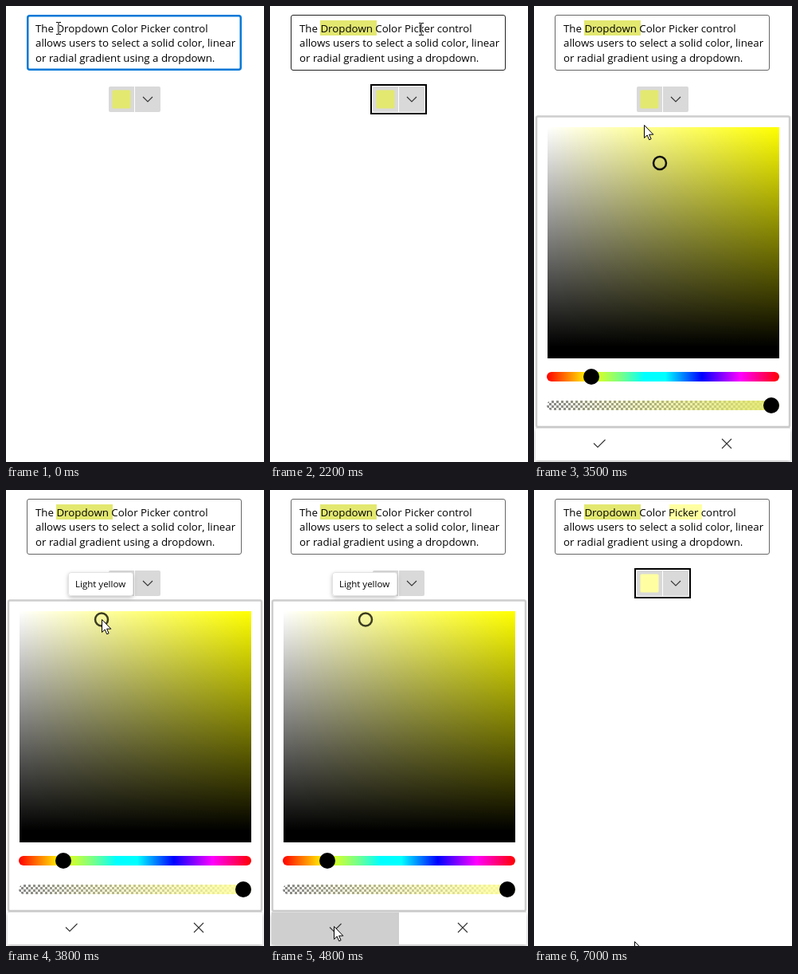
Recreate the animation shown at these times as an HTML page. Size 324x572 px, loop 7100 ms.

```html
<!DOCTYPE html>
<html lang="en">
<head>
<meta charset="utf-8">
<title>Dropdown color picker</title>
<style>
  html, body { margin: 0; width: 100%; height: 100%; overflow: hidden; background: #fff; }
  svg { display: block; isolation: isolate; font: 13.3px "Open Sans", "Noto Sans", sans-serif; }
  .small { font-size: 11.53px; }
  .icon { fill: none; stroke: #333; stroke-width: 1.1; }
  #beam { fill: none; stroke: #fff; mix-blend-mode: difference; }
</style>
</head>
<body>
<svg width="324" height="572" viewBox="0 0 324 572">
  <defs>
    <linearGradient id="saturation"><stop stop-color="#fff"/><stop offset="1" stop-color="#ff0"/></linearGradient>
    <linearGradient id="value" x2="0" y2="1"><stop stop-opacity="0"/><stop offset=".95"/></linearGradient>
    <linearGradient id="hue">
      <stop stop-color="#f00"/><stop offset=".18" stop-color="#ff0"/>
      <stop offset=".32" stop-color="#7f8"/><stop offset=".42" stop-color="#0ff"/>
      <stop offset=".51" stop-color="#0ff"/><stop offset=".667" stop-color="#00f"/>
      <stop offset=".833" stop-color="#f0f"/><stop offset="1" stop-color="#f00"/>
    </linearGradient>
    <linearGradient id="alpha">
      <stop class="picked" stop-opacity="0"/><stop class="picked" offset="1"/>
    </linearGradient>
    <pattern id="checker" width="6" height="6" x="16" y="495" patternUnits="userSpaceOnUse">
      <path fill="#fff" d="M0 0h6v6H0z"/><path fill="#888" d="M0 0h3v3H0zM3 3h3v3H3z"/>
    </pattern>
    <filter id="shadow" x="-20%" y="-40%" width="140%" height="190%">
      <feDropShadow dx="0" dy="2" stdDeviation="2.5" flood-opacity=".25"/>
    </filter>
    <clipPath id="selectionClip"><rect id="clipBox" y="18" height="19"/></clipPath>
    <g id="copy">
      <text x="37" y="33">The Dropdown Color Picker control</text>
      <text x="37" y="51">allows users to select a solid color, linear</text>
      <text x="37" y="70">or radial gradient using a dropdown.</text>
    </g>
  </defs>

  <path fill="#fff" d="M0 0h324v572H0z"/>

  <rect id="field" fill="#fff"/>
  <path id="goldMark" fill="#e3e870" d="M63 18h71v19H63z"/>
  <path id="lightMark" fill="#ffffa2" d="M170 18h41v19h-41z"/>
  <rect id="selection" y="18" height="19" fill="#0078d7"/>
  <use href="#copy"/>
  <use href="#copy" fill="#fff" clip-path="url(#selectionClip)"/>

  <path id="leftPart" d="M131 101h30v32h-30q-2 0-2-2v-28q0-2 2-2z"/>
  <path id="rightPart" d="M162 101h30q2 0 2 2v28q0 2-2 2h-30z"/>
  <rect id="swatchEdge" x="133.5" y="105.5" width="23" height="23" rx="1.5" fill="none" stroke="#d2d2d2"/>
  <rect id="swatch" x="133.5" y="105.5" width="23" height="23" rx="1.5"/>
  <path class="icon" d="M172 114l6 6 6-6"/>
  <rect id="ring" x="127" y="99" width="69" height="36" fill="none" stroke="#000" stroke-width="2"/>
  <text id="goldTip" class="small" x="143" y="157" fill="#c6c6c6">Gold</text>

  <g id="popup">
    <rect x="3" y="138.5" width="318" height="389.5" rx="2" fill="#fff" stroke="#cdcdcd" stroke-width="2.5"/>
    <rect x="2" y="530" width="320" height="40" fill="#fff" filter="url(#shadow)"/>
    <path stroke="#dedede" d="M2 529.5h320"/>
    <path id="accept" d="M2 530h160v40H2z"/>
    <path class="icon" d="M75 548.5l5 5 9.5-9.5M236 543l12 12M248 543l-12 12"/>
    <path fill="url(#saturation)" d="M17 152h291v290H17z"/>
    <path fill="url(#value)" d="M17 152h291v290H17z"/>
    <circle id="thumb" r="8" fill="none" stroke-width="2.5"/>
    <rect x="16" y="459" width="292" height="12" rx="6" fill="url(#hue)"/>
    <circle cx="72" cy="465" r="10"/>
    <rect x="16" y="495" width="292" height="12" rx="6" fill="url(#checker)"/>
    <rect x="16" y="495" width="292" height="12" rx="6" fill="url(#alpha)"/>
    <circle cx="298" cy="501" r="10"/>
  </g>

  <g id="lightTip">
    <rect x="78.5" y="103.5" width="81" height="29" rx="3" fill="#fff" stroke="#e2e2e2" filter="url(#shadow)"/>
    <text class="small" x="87" y="122">Light yellow</text>
  </g>

  <path id="beam" d="M-3 -7.5h2.5l.5 .5 .5 -.5h2.5M0 -7v14M-3 7.5h2.5l.5 -.5 .5 .5h2.5"/>
  <path id="arrow" fill="#fff" stroke="#000" d="M.5 .5v16l3.7-3.5 2.5 5.8 2.4-1-2.5-5.6h5.2z"/>
</svg>

<script>
const LOOP = 7100, STEP = 100;
const GOLD = '#e3e870', LIGHT = '#ffffa2';
const $ = id => document.getElementById(id);

const set = (id, attrs) => {
  for (const name in attrs) $(id).setAttribute(name, attrs[name]);
};
const show = (id, on) => set(id, { visibility: on ? 'visible' : 'hidden' });

// Latest entry whose start time has passed.
const at = (track, t) => track.filter(key => key[0] <= t).pop();

// start, x, y, pointer
const pointer = [
  [0, 66, 28, 'beam'], [300, 69, 28, 'beam'], [400, 74, 28, 'beam'], [500, 79, 28, 'beam'],
  [900, 118, 40, 'beam'], [1000, 166, 84, 'arrow'], [1100, 152, 108, 'arrow'], [1200, 144, 118, 'arrow'],
  [1900, 148, 104, 'arrow'], [2000, 160, 72, 'beam'], [2100, 178, 45, 'beam'], [2200, 190, 29, 'beam'],
  [2600, 189, 40, 'beam'], [2700, 184, 65, 'beam'], [2800, 180, 88, 'arrow'], [2900, 178, 104, 'arrow'],
  [3000, 177, 110, 'arrow'], [3400, 160, 128, 'arrow'], [3500, 138, 149, 'arrow'],
  [3600, 127, 157, 'arrow'], [3700, 120, 162, 'arrow'],
  [4000, 117, 180, 'arrow'], [4100, 107, 272, 'arrow'], [4200, 95, 366, 'arrow'],
  [4300, 87, 460, 'arrow'], [4400, 83, 522, 'arrow'], [4500, 80, 547, 'arrow'],
  [4900, 76, 557, 'arrow'], [5000, 63, 565, 'arrow'], [7000, 126, 566, 'arrow']
];

// start, x, width
const selected = [
  [0, 63, 0], [400, 63, 10], [500, 63, 15], [700, 63, 71],
  [1600, 63, 0], [2400, 170, 41], [3200, 170, 0]
];

// start, fill
const leftFill = [[0, '#d9d9d9'], [1200, '#f5f5f5'], [1600, '#9b9c98'], [1700, '#f5f5f5'], [2000, '#d9d9d9']];
const rightFill = [[0, '#d9d9d9'], [2900, '#f5f5f5'], [3200, '#9b9c98'], [3400, '#d9d9d9']];
const acceptFill = [[0, '#fff'], [4500, '#ececec'], [4800, '#cfcfcf']];

function draw(t) {
  const during = (from, to = LOOP) => t >= from && t < to;

  const focused = during(0, 1600) || during(2400, 3200);
  const inset = focused ? 1.25 : .5;
  set('field', {
    x: 26 + inset, y: 11 + inset, width: 270 - 2 * inset, height: 70 - 2 * inset, rx: 2.5,
    stroke: focused ? '#0078d7' : during(2000, 2400) ? '#222' : '#666',
    'stroke-width': 2 * inset
  });

  const [, x, width] = at(selected, t);
  set('selection', { x, width });
  set('clipBox', { x, width });
  show('goldMark', during(1700));
  show('lightMark', during(4900));

  const picked = during(3700) ? LIGHT : GOLD;
  set('leftPart', { fill: at(leftFill, t)[1] });
  set('rightPart', { fill: at(rightFill, t)[1] });
  set('swatch', { fill: picked });
  show('swatchEdge', during(1200, 2000));
  show('ring', during(1700, 2400) || during(4900));

  show('goldTip', during(3300, 3400));
  show('popup', during(3400, 4900));
  show('lightTip', during(3800, 4900));
  set('accept', { fill: at(acceptFill, t)[1] });
  set('thumb', during(3700)
    ? { cx: 120, cy: 162.5, stroke: '#3c3c22' }
    : { cx: 158, cy: 197, stroke: '#111' });
  document.querySelectorAll('.picked').forEach(stop => stop.setAttribute('stop-color', picked));

  const [, px, py, kind] = at(pointer, t);
  for (const id of ['beam', 'arrow']) {
    show(id, id === kind);
    set(id, { transform: `translate(${px} ${py})` });
  }
}

function tick() {
  const t = performance.now() % LOOP;
  draw(Math.floor(t / STEP) * STEP);
  requestAnimationFrame(tick);
}
tick();
</script>
</body>
</html>
```
